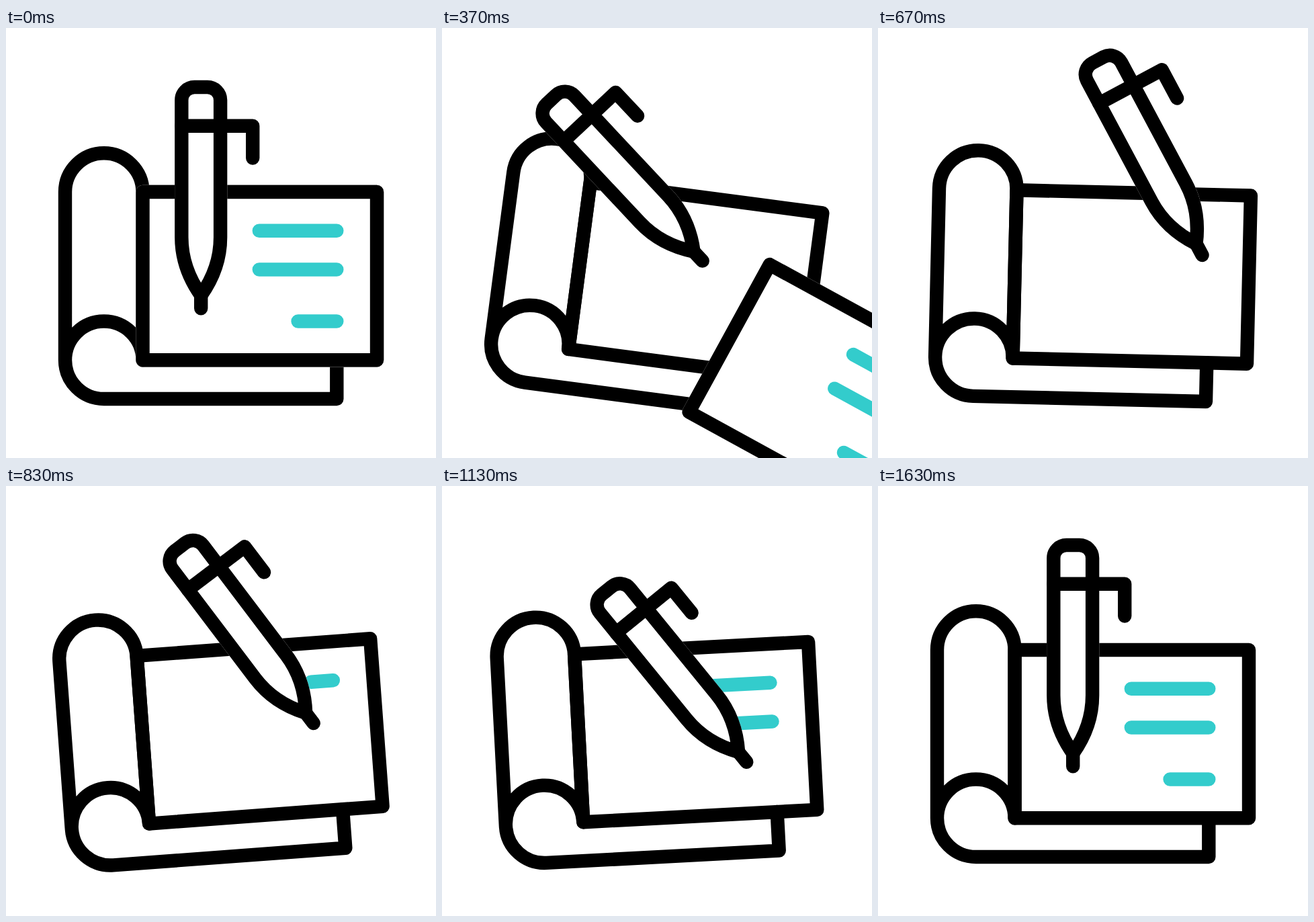
An HTML page for the animation above (2000 ms loop, 640 px wide and 640 px high).

```html
<!DOCTYPE html>
<html lang="en">
<head>
<meta charset="utf-8">
<title>Pen and paper</title>
<style>
  html, body { margin: 0; width: 100%; height: 100%; overflow: hidden; background: #fff; }
  svg { display: block; width: 100%; height: 100%; }
  .ink { fill: none; stroke: #000; }
  .back { fill: #fff; stroke: #fff; }
  .note { fill: none; stroke: #3cc; }
</style>
</head>
<body>
<svg viewBox="0 0 640 640" stroke-width="20.4" stroke-linecap="round" stroke-linejoin="round">
  <defs>
    <path id="page" d="M203.5 244H552V494.3H203.5Z"/>
    <path id="barrel" d="M290.2 398C272.4 373 261.3 343 261.3 311.5V107.3A19.3 19.3 0 0 1 280.6 88H299.8A19.3 19.3 0 0 1 319.1 107.3V311.5C319.1 343 308 373 290.2 398Z"/>
  </defs>
  <g id="paper">
    <use href="#page" class="ink"/>
    <path class="ink" d="M88 494.3V244A57.75 57.75 0 0 1 203.5 244V494.3A57.75 57.75 0 0 0 88 494.3A57.75 57.75 0 0 0 145.8 552H492.3V494.3"/>
    <path class="note" id="written"/>
  </g>
  <g id="sheet">
    <use href="#page" class="back"/>
    <use href="#page" class="ink"/>
    <path class="note" id="printed"/>
  </g>
  <g id="pen">
    <use href="#barrel" class="back"/>
    <use href="#barrel" class="ink"/>
    <path class="ink" d="M261.3 145.8H367.2V193.6M290.2 398V417.2"/>
  </g>
</svg>
<script>
const LOOP = 2000, FPS = 30;
const [paper, sheet, pen, written, printed] =
  ['paper', 'sheet', 'pen', 'written', 'printed'].map(id => document.getElementById(id));

// smooth 0..1 between two moments, counted in steps of 1/FPS s
function ease(f, from, to) {
  const p = Math.min(1, Math.max(0, (f - from) / (to - from)));
  return p * p * (3 - 2 * p);
}
const mix = (a, b, e) => a.map((v, i) => v + (b[i] - v) * e);

// moves the pivot to (x, y) and turns the part around it
function place(el, [px, py], [x, y, angle]) {
  el.setAttribute('transform', `translate(${x} ${y}) rotate(${angle}) translate(${-px} ${-py})`);
}

// three lines on the layout grid, each drawn from its right end
const UNIT = 19.25, RIGHT = 492.3;
function notes(progress) {
  let d = '';
  for (let i = 0; i < 3; i++) {
    const last = i === 2, e = progress(i);
    const y = 301.8 + UNIT * (3 * i + last);
    if (e > 0) d += `M${RIGHT} ${y}h${-UNIT * (last ? 3 : 6) * e}`;
  }
  return d;
}
printed.setAttribute('d', notes(() => 1));

// pen poses: tip x, tip y, angle
const HOME = [290.2, 417.2, 0];
const PUSH = [389.7, 345.5, -44];
const READY = [482.5, 338, -28.1];
const LEAN = [412, 381, -53.8];
const DONE = [494.5, 440.5, -24.6];

function penPose(f) {
  const push = ease(f, 0, 12);
  let pose = mix(HOME, PUSH, push);
  pose[1] -= 4 * Math.sin(Math.PI * push);
  pose = mix(pose, READY, ease(f, 12, 20));
  pose = mix(pose, LEAN, ease(f, 23, 28));
  pose = mix(pose, DONE, ease(f, 28, 40));
  return mix(pose, HOME, ease(f, 40, 49));
}

// tilts right as the sheet leaves, left while writing
function paperAngle(f) {
  return 11.8 * ease(f, 5.2, 15) - 10.45 * ease(f, 15, 20)
    - 15.85 * ease(f, 23, 28) + 14.5 * ease(f, 28, 36.5);
}

const PAPER_MID = [320, 369], SHEET_MID = [377.75, 369.15];
const WRITE_START = 23, WRITE_STEP = 17 / 3;

function draw(f) {
  place(pen, HOME, penPose(f));
  place(paper, PAPER_MID, [...PAPER_MID, paperAngle(f)]);

  const [x, y] = SHEET_MID;
  place(sheet, SHEET_MID,
    [x + 384 * ease(f, 1.3, 20), y + 493 * ease(f, 4.9, 20), 66.4 * ease(f, 3.5, 20)]);
  sheet.style.display = f < 20 ? '' : 'none';

  written.setAttribute('d', notes(i => {
    const start = WRITE_START + WRITE_STEP * i;
    return ease(f, start, start + WRITE_STEP);
  }));
}

function tick() {
  const t = performance.now() % LOOP;
  draw(Math.floor((t + 4) * FPS / 1000));
  requestAnimationFrame(tick);
}
tick();
</script>
</body>
</html>
```
